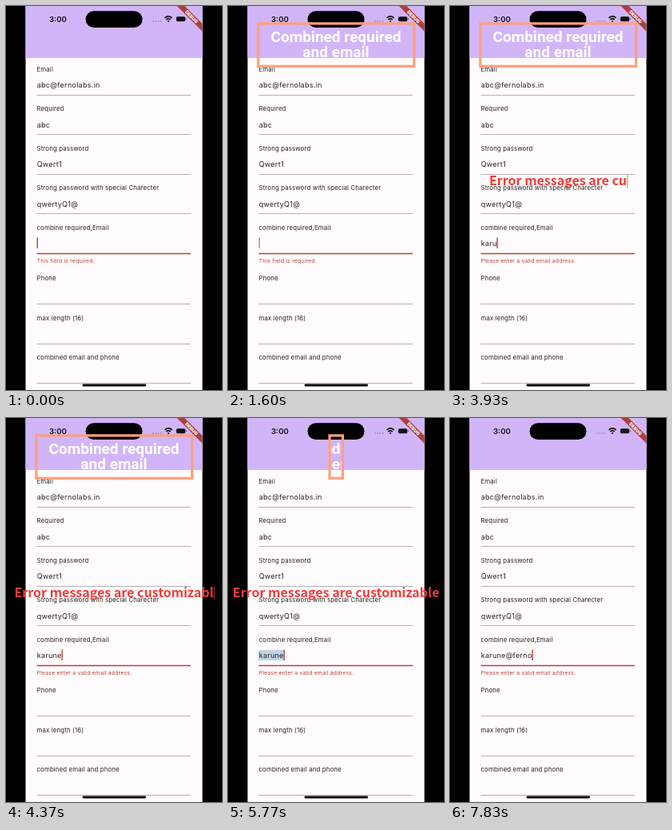
Write an HTML page that moves like this. It is 270 by 480 pixels and loops after 7.86 s.

```html
<!DOCTYPE html>
<html lang="en">
<head>
<meta charset="utf-8">
<style>
html, body { margin: 0; width: 100%; height: 100%; overflow: hidden; background: #000; }
svg { display: block; width: 270px; height: 480px; }
text { font-family: Inter, Roboto, sans-serif; fill: #27211f; white-space: pre; }
.label { font-size: 7.8px; letter-spacing: .15px; }
.value { font-size: 9px; letter-spacing: .28px; }
#hint { font-size: 6.75px; letter-spacing: .23px; fill: #ba4034; }
.title { font: 700 19px Roboto, sans-serif; fill: #fff; text-anchor: middle; }
#note { font: 700 16px "Noto Sans CJK SC", "Noto Sans CJK JP", "Noto Sans CJK", "Noto Sans", sans-serif; fill: #f43a38; text-anchor: middle; }
</style>
</head>
<body>
<svg viewBox="0 0 270 480">
  <defs>
    <clipPath id="screen"><path d="M24.5 0H245.5V480H24.5Z"/></clipPath>
    <clipPath id="reveal"><rect id="window" y="20" height="57"/></clipPath>
  </defs>
  <rect width="270" height="480"/>
  <g clip-path="url(#screen)">
    <rect x="24" width="222" height="480" fill="#fffcfe"/>
    <rect x="24" width="222" height="65" fill="#d2b5f9"/>
    <g id="form"></g>
    <rect id="selection" x="38" y="290" height="13" fill="#c0d4e8"/>
    <path d="M38.5 309.5H231" stroke="#ba4030" stroke-width="1.3"/>
    <text id="typed" class="value" x="38.7" y="300"></text>
    <rect id="caret" y="289.5" width="1.4" height="13.5" fill="#bb4035"/>
    <text id="hint" x="38.7" y="321"></text>
    <g transform="translate(245.5) rotate(45)">
      <rect x="-34" y="15.7" width="68" height="6.8" fill="#ab4140"/>
      <text y="21.2" text-anchor="middle" style="font-size:5.8px;font-weight:900;fill:#fff">DEBUG</text>
    </g>
    <text x="54" y="20" style="font-size:9.6px;font-weight:600;fill:#111">3:00</text>
    <path d="M184 19H194" stroke="#85719a" stroke-width="1.6" stroke-linecap="round" stroke-dasharray="0 3.2"/>
    <g fill="none" stroke="#111" stroke-width="1.6">
      <path d="M198.4 14.8Q203 10.8 207.6 14.8M200.2 17Q203 14.6 205.8 17"/>
      <path d="M203 20L201.9 18.9Q203 18 204.1 18.9Z" stroke-width=".7" fill="#111"/>
    </g>
    <rect x="212.8" y="13.2" width="11.4" height="6" rx="1.8" fill="#111"/>
    <rect x="224.8" y="15" width=".9" height="2.3" fill="#555"/>
    <rect x="99.5" y="6.3" width="71" height="20.8" rx="10.4"/>
    <rect x="95.5" y="472.6" width="79.5" height="2.8" rx="1.4"/>
  </g>
  <g clip-path="url(#reveal)">
    <text class="title" x="135" y="44.7">Combined required</text>
    <text class="title" x="135" y="63.7">and email</text>
  </g>
  <rect id="frame" y="21.9" height="53.4" fill="none" stroke="#ffa07c" stroke-width="3.2"/>
  <text id="note" x="135" y="223.8"></text>
  <rect id="noteCaret" y="210.5" width="1" height="16.5" fill="#d9483a" opacity=".7"/>
</svg>
<script>
const LOOP = 7860;
const ADDRESS = "karune@ferno";
const KEY_TIMES = [2560, 2700, 3200, 3600, 4060, 4140, 6400, 6780, 7020, 7200, 7350, 7500];
const NOTE = "Error messages are customizable";
const SELECT_AT = 4950, AT_SIGN = 6400;

// label, label baseline, value
const FIELDS = [
  ["Email", 81.5, "abc@fernolabs.in"],
  ["Required", 131.1, "abc"],
  ["Strong password", 180.6, "Qwert1"],
  ["Strong password with special Charecter", 230.2, "qwertyQ1@"],
  ["combine required,Email", 279.8, ""],
  ["Phone", 343, ""],
  ["max length (16)", 392.5, ""],
  ["combined email and phone", 442.1, ""]
];

const $ = id => document.getElementById(id);
const clamp = v => Math.max(0, Math.min(1, v));
const set = (el, attrs) => { for (const k in attrs) el.setAttribute(k, attrs[k]); };
const show = (el, on) => set(el, { visibility: on ? "visible" : "hidden" });
const write = (el, s) => { if (el.textContent !== s) el.textContent = s; };

$("form").innerHTML = FIELDS.map(([label, y, value], i) => `
  <text class="label" x="38.5" y="${y}">${label}</text>
  <text class="value" x="38.7" y="${y + 20.4}">${value}</text>
  ${i === 4 ? "" : `<path d="M38.5 ${Math.round(y + 29) + .5}H231" stroke="#b0a8a8" stroke-width=".9"/>`}`).join("");

// Steady for half a second after a key, then fading out and in
function caretAlpha(age) {
  const p = age % 1000;
  const level = p >= 500 ? 1 - clamp((p - 500) / 250)
    : age < 500 ? 1 : clamp(p / 250);
  return .3 + .7 * level;
}

function drawTitle(t) {
  const w = 198 * Math.min(clamp((t - 555) / 1000), clamp((5870 - t) / 1000));
  const x = 135.2 - w / 2;
  set($("window"), { x: x + 3.2, width: Math.max(0, w - 6.4) });
  set($("frame"), { x: x + 1.6, width: Math.max(0, w - 3.2) });
  show($("frame"), w > 4);
}

function drawField(t) {
  const n = KEY_TIMES.filter(k => k <= t).length;
  write($("typed"), ADDRESS.slice(0, n));
  write($("hint"), n ? "Please enter a valid email address." : "This field is required.");
  const width = n ? $("typed").getComputedTextLength() : 0;
  const selected = t >= SELECT_AT && t < AT_SIGN;
  const lastKey = n ? KEY_TIMES[n - 1] : 0;
  set($("selection"), { width: width + 1 });
  show($("selection"), selected);
  set($("caret"), { x: 38.5 + width, opacity: selected ? 1 : caretAlpha(t - lastKey) });
}

function drawNote(t) {
  const typed = (t - 2900) / 1500 * NOTE.length;
  const left = (7840 - t) / 30;
  const n = Math.max(0, Math.min(NOTE.length, Math.floor(Math.min(typed, left))));
  write($("note"), NOTE.slice(0, n));
  const width = n ? $("note").getComputedTextLength() : 0;
  const blinkOff = t >= 5380 && t < 6880 && Math.floor((t - 5380) / 500) % 2 === 0;
  set($("noteCaret"), { x: 135 + width / 2 + .3 });
  show($("noteCaret"), n > 0 && !blinkOff);
}

function draw() {
  const t = performance.now() % LOOP;
  drawTitle(t);
  drawField(t);
  drawNote(t);
  requestAnimationFrame(draw);
}
draw();
</script>
</body>
</html>
```
